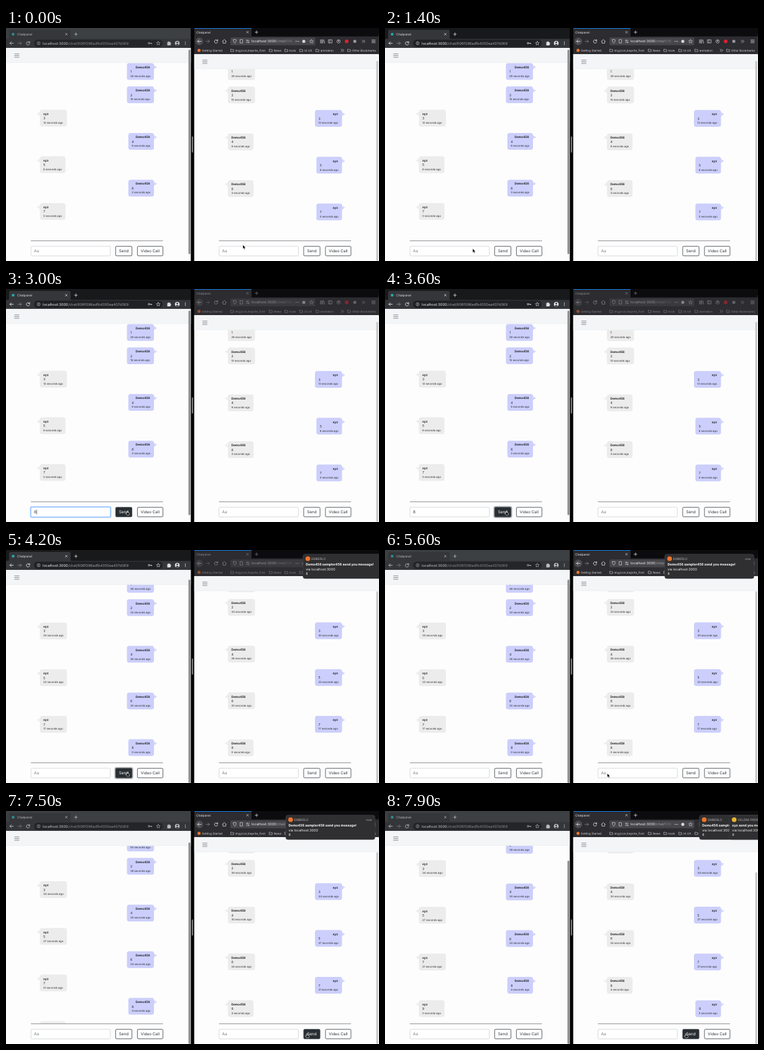
Recreate the animation shown at these times as an HTML page. Size 600 px wide and 375 px high, loop 8 s.

```html
<!DOCTYPE html>
<html lang="en">
<head>
<meta charset="utf-8">
<title>Chat</title>
<style>
  html, body { margin: 0; width: 100%; height: 100%; overflow: hidden; background: #000; }
  svg { display: block; width: 600px; height: 375px; }
  text { font-family: Inter, "Liberation Sans", sans-serif; text-rendering: geometricPrecision; white-space: pre; }
  .line { fill: none; stroke-linecap: round; stroke-linejoin: round; }
</style>
</head>
<body>
<svg id="stage" viewBox="0 0 600 375"></svg>
<script>
const LOOP = 8000;
const PAGE_X = 302.5;
const USERS = { a: 'Demo456', b: 'xyz' };
const SENDERS = 'aabababab';
const SENT = [3610, 7430];
const AGES = [
  [29, 15, 12, 9, 6, 3, 0],
  [46, 32, 30, 26, 23, 20, 17, 0],
  [50, 36, 34, 30, 27, 24, 21, 4, 0]
];

// Cursor stops: time, x, y
const PATH = [
  [0, 381, 349], [400, 381, 349], [1200, 141, 355], [2450, 141, 355],
  [2900, 195, 357.5], [4800, 195, 357.5], [5500, 357.5, 359.5],
  [6850, 357.5, 359.5], [7250, 484, 358.5], [LOOP, 484, 358.5]
];

const CHATS = [
  { x: 0, me: 'a', head: 32, first: 56.4, pitch: 37.55, scroll: [14.7, 37.6], lag: 0,
    focus: 1500, typed: 2000, blur: 3400, clear: SENT[0], digit: '8', bar: [293.6, 35, '#858585'] },
  { x: PAGE_X, me: 'b', head: 42, first: 56.7, pitch: 37.65, scroll: [15.6, 37.6], lag: 60,
    focus: 6050, typed: 6500, blur: 7300, clear: SENT[1], digit: '9', bar: [293.2, 53, '#c4c4c4'] }
];

const stage = document.getElementById('stage');
const get = id => document.getElementById(id);
const show = (el, on) => el.setAttribute('visibility', on ? 'visible' : 'hidden');
const move = (el, x, y) => el.setAttribute('transform', `translate(${x} ${y})`);
const ease = (t, start, span) => {
  const p = Math.min(1, Math.max(0, (t - start) / span));
  return (1 - Math.cos(Math.PI * p)) / 2;
};

const text = (x, y, s, size, fill, more = '') =>
  `<text x="${x}" y="${y}" font-size="${size}" fill="${fill}" ${more}>${s}</text>`;
const rect = (x, y, w, h, fill, more = '') =>
  `<rect x="${x}" y="${y}" width="${w}" height="${h}" fill="${fill}" ${more}/>`;
const dot = (x, y, r, fill, more = '') =>
  `<circle cx="${x}" cy="${y}" r="${r}" fill="${fill}" ${more}/>`;
const line = (d, color, w = 0.8, more = '') =>
  `<path class="line" d="${d}" stroke="${color}" stroke-width="${w}" ${more}/>`;

const arrow = (x, y, dir, c) =>
  line(`M${x - 2.8} ${y}h5.6M${x + dir * 2.8} ${y}l${-dir * 2.5} -2.5m${dir * 2.5} 2.5l${-dir * 2.5} 2.5`, c, 0.9);
const reload = (x, y, c) =>
  line(`M${x + 2.3} ${y - 1.2}a2.7 2.7 0 1 0 .3 2M${x + 2.6} ${y - 2.8}v1.9h-1.9`, c, 0.9);
const cross = (x, y, c) => line(`M${x - 1.5} ${y - 1.5}l3 3m0 -3l-3 3`, c, 0.7);
const plus = (x, y, c) => line(`M${x - 2.3} ${y}h4.6m-2.3 -2.3v4.6`, c, 0.8);
const bars = (x, y, w, gap, c) => line(`M${x} ${y}h${w}m${-w} ${gap}h${w}m${-w} ${gap}h${w}`, c, 0.8);
const star = (x, y, c) =>
  line(`M${x} ${y - 3}l.9 2 2.2 .2-1.7 1.4 .5 2.2-1.9-1.2-1.9 1.2 .5-2.2-1.7-1.4 2.2-.2z`, c, 0.6);
const more = (x, y, dx, dy, c) =>
  [-1, 0, 1].map(k => dot(x + k * dx, y + k * dy, 0.65, c)).join('');
const chevrons = (x, y, c) => line(`M${x - 2} ${y - 2}l2 2-2 2m2.6 -4l2 2-2 2`, c, 0.7);
const folder = (x, y, c) => line(`M${x - 2.2} ${y - 1.9}h1.6l.7 .8h2.2v3h-4.5z`, c, 0.6);

function chrome() {
  const c = '#dfe1e4', dim = '#85888c', y = 24.5;
  return rect(0, 0, 297.5, 18, '#202124', 'id="strip"') +
    '<path d="M3 18q2 0 2-2v-10.5q0-2.5 2.5-2.5h94q2.5 0 2.5 2.5v10.5q0 2 2 2z" fill="#35363a"/>' +
    rect(0, 17.5, 297.5, 14.5, '#35363a') + '<g id="leftUi">' +
    dot(11.5, 10, 2.3, '#2aa5a8') + text(18, 11.8, 'Chatpanel', 5, c) +
    cross(97, 10, c) + plus(112.5, 10, c) +
    arrow(9, y, -1, c) + arrow(22, y, 1, dim) + reload(35.5, y, c) +
    rect(45, 18.8, 207, 11.6, '#202124', 'rx="5.8"') +
    dot(52.5, y, 2.4, 'none', `stroke="${c}" stroke-width=".6"`) + line('M52.5 24.3v1.3m0-2.5v.1', c, 0.6) +
    text(59, 26.5, 'localhost:3000<tspan fill="#a0a3a8">/chat/606f096adfb4350ea407d369</tspan>', 5.75, '#f1f3f4') +
    dot(230, y, 1.3, 'none', `stroke="${c}" stroke-width=".8"`) + line('M231.4 24.5h3v1.2', c, 0.9) +
    star(245, y, c) +
    `<path d="M259.5 22.5h1.6a1 1 0 0 1 2 0h1.6v1.8a1 1 0 0 1 0 2v1.7h-5.2z" fill="${c}"/>` +
    dot(275.5, y, 3.8, c) + dot(275.5, 23.2, 1.3, '#35363a') +
    '<path d="M273 27q2.5-3 5 0q-2.500 1.800-5 0z" fill="#35363a"/>' +
    more(288.5, y, 0, 2, c) + '</g>';
}

function browser() {
  const c = '#d7d7db', dim = '#77777c', y = 21.5;
  const marks = [[364, 'img,Icon,Insprite_Font'], [426, 'News'], [451, 'tools'],
    [475, 'UI UX'], [501, 'animation'], [552, 'Other Bookmarks']];
  return rect(302.5, 0, 297.5, 14, '#0c0c0e') + rect(303, 0, 92, 14, '#2c2c31') +
    rect(303, 0, 92, 0.9, '#0a84ff') + rect(302.5, 13.5, 297.5, 28.500, '#2c2c31') +
    '<g id="rightUi">' + text(306, 8.8, 'Chatpanel', 4.8, '#f0f0f2') +
    cross(388.5, 6.8, c) + plus(403, 6.8, c) +
    dot(311, y, 5.8, '#4a4a50', 'stroke="#6a6a70" stroke-width=".4"') + arrow(311, y, -1, c) +
    arrow(324.500, y, 1, dim) + reload(338, y, c) +
    line('M348 21.500l3.200-3 3.200 3m-5.400-.6v3.500h4.400v-3.500', c, 0.8) +
    rect(361, 15.3, 136.500, 12.400, '#46464b', 'rx="1.500"') +
    line('M365.700 19l2.300-.8 2.300 .8q0 4.200-2.300 5.600q-2.300-1.400-2.300-5.600z', c, 0.7) +
    rect(376.700, 18.700, 3.800, 5.400, 'none', `stroke="${c}" stroke-width=".7"`) +
    line('M386.500 20h5m-5 3h5m-3.500-4v2m2 1v2', c, 0.7) +
    text(395, 23.4, 'localhost:3000<tspan fill="#a5a5aa">/chat/</tspan><tspan fill="#77777c">606</tspan>', 5.6, '#f6f6f8') +
    more(468.500, y, 2.200, 0, c) + dot(479, y, 2.500, c) + star(491.500, y, c) +
    line('M506 18.800v5.600m1.800-5.600v5.600m1.800-5.600v5.600m1.500-5.400l1.500 5.400', c, 0.8) +
    rect(518.800, 19, 5.600, 5, 'none', `stroke="${c}" stroke-width=".7"`) + line('M521 19v5', c, 0.7) +
    dot(535, y, 2.700, 'none', `stroke="${c}" stroke-width=".7"`) + dot(535, 21, 1, c) +
    dot(548, y, 3, '#d8232f') +
    rect(558.800, 19.200, 4.600, 4.600, '#9a9aa0', 'rx=".8"') + chevrons(575, y, c) +
    bars(588.500, 19.300, 5.400, 2.200, c) +
    dot(310.500, 36, 2.500, '#f0742c') + text(315, 37.700, 'Getting Started', 4.65, c) +
    marks.map(([x, s]) => folder(x, 36, c) + text(x + 4.7, 37.700, s, 4.65, c)).join('') +
    chevrons(541, 36, c) + '</g>';
}

function bubble(chat, i, n) {
  const who = SENDERS[n], mine = who === chat.me;
  const fill = mine ? '#cccffb' : '#ececec';
  const tail = mine ? 'M237.500 3.200l5.500 3.400-5.500 3.600z' : 'M55 3.200l-5.800 3.400 5.800 3.600z';
  const name = mine
    ? text(231.500, 8.300, USERS[who], 4.8, '#1d1f23', 'font-weight="700" text-anchor="end"')
    : text(60, 8.300, USERS[who], 4.8, '#1d1f23', 'font-weight="700"');
  return `<g id="b${i}${n}"><path d="${tail}" fill="${fill}" opacity=".8"/>` +
    rect(54.500, 0, 43, 27, fill, 'rx="3.500"') + name +
    text(60, 15.700, n + 1, 5.3, '#24262a') + text(60, 22.300, '', 4.3, '#24262a') + '</g>';
}

function page(chat, i) {
  const top = chat.head, edge = 'stroke="#343a40" stroke-width=".8"';
  const [barX, , barColor] = chat.bar;
  return `<g transform="translate(${chat.x} 0)">` +
    rect(0, top, 297.500, 375 - top, '#fdfdfd') +
    `<clipPath id="clip${i}"><rect x="0" y="${top + 24}" width="297.500" height="${318 - top}"/></clipPath>` +
    `<g clip-path="url(#clip${i})">` + [...SENDERS].map((_, n) => bubble(chat, i, n)).join('') + '</g>' +
    rect(0, top, 297.500, 24, '#f3f5f7') + rect(0, top + 23.700, 297.500, 0.4, '#e2e5e8') +
    bars(13.800, top + 9.700, 7.200, 2.700, '#6f7276') +
    rect(40, 342, 212.500, 0.8, '#77797c') +
    rect(39.500, 350.500, 129, 17, 'none', `id="ring${i}" rx="2.200" stroke="#9cc6fe" stroke-width="1.700"`) +
    rect(40.200, 351.200, 127.600, 15.600, '#fff', `id="box${i}" rx="1.600" stroke="#c6cacf" stroke-width=".7"`) +
    text(45, 361.300, 'Aa', 6.5, '#7b8086', `id="value${i}"`) +
    rect(49.200, 355.300, 0.5, 7.400, '#111', `id="caret${i}"`) +
    rect(175.300, 350.300, 28.500, 17.400, 'none', `id="halo${i}" rx="2.300" stroke="#a9acb0" stroke-width="1.500"`) +
    rect(176.400, 351.300, 26.200, 15.400, '#fff', `id="send${i}" rx="1.700" ${edge}`) +
    text(189.500, 361.300, 'Send', 6.4, '#2b3035', `id="label${i}" text-anchor="middle"`) +
    rect(211.400, 351.300, 41, 15.400, '#fff', `rx="1.700" ${edge}`) +
    text(231.900, 361.300, 'Video Call', 6.3, '#2b3035', 'text-anchor="middle"') +
    rect(barX, 0, 2.900, 329, barColor, `id="bar${i}" rx="1.400"`) + '</g>';
}

function notice(id, app, color, title, body) {
  return `<g id="${id}">` +
    rect(0, 6.700, 143.500, 39.300, '#2f2f31', 'rx="3.500" stroke="#4b4b4d" stroke-width=".5"') +
    dot(7.800, 14, 3.800, color) + text(13.500, 15.900, app, 4.9, '#b4b4b6') +
    text(138.500, 15.900, 'now', 4.6, '#b4b4b6', 'text-anchor="end"') +
    text(4.500, 24.900, title, 5.3, '#fff', 'font-weight="700"') +
    text(4.500, 32.500, 'via localhost:3000', 5.45, '#f2f2f2') +
    text(4.500, 40.300, body, 5.45, '#f2f2f2') + '</g>';
}

stage.innerHTML = rect(0, 0, 600, 375, '#000') +
  CHATS.map(page).join('') + chrome() + browser() +
  rect(297.500, 0, 5, 375, '#050505') + rect(299, 174.500, 1.800, 26, '#8a8a8a', 'rx=".9"') +
  notice('note0', 'EMBERLO', '#f0742c', `${USERS.a} sampler456 send you message!`, '8') +
  notice('note1', 'VELDRA PRISMO', '#eab42e', `${USERS.b} send you message!`, '9') +
  '<path id="arrow" d="M0 0v6.400l1.500-1.300 1 2.300 1.200-.5-1-2.200h2z" fill="#000" stroke="#fff" stroke-width=".5"/>' +
  '<path id="hand" d="M-.7 0q.7-.8 1.300 0v2.300l2.400 .5q.8 .3 .6 1.200l-.5 2.400h-3.500l-2.200-2.700q.3-1 1.900 0z" fill="#111" stroke="#fff" stroke-width=".6"/>';

function cursorAt(t) {
  const k = Math.max(1, PATH.findIndex(p => p[0] > t));
  const [t0, x0, y0] = PATH[k - 1], [t1, x1, y1] = PATH[k];
  const p = ease(t, t0, t1 - t0);
  return [x0 + (x1 - x0) * p, y0 + (y1 - y0) * p];
}

function drawChat(chat, i, t, cursorX) {
  const ages = AGES[SENT.filter(s => t >= s).length];
  const scroll = SENT.reduce((sum, s, k) => sum + chat.scroll[k] * ease(t, s + chat.lag, 350), 0);
  for (let n = 0; n < SENDERS.length; n++) {
    const el = get(`b${i}${n}`), on = n < ages.length;
    show(el, on);
    if (!on) continue;
    move(el, 0, chat.first + n * chat.pitch - scroll);
    const [box, name, num, age] = [...el.children].slice(1);
    const width = ages[n] > 9 ? 43.5 : 41.2;
    const x = SENDERS[n] === chat.me ? 238 - width : 54.5;
    box.setAttribute('x', x);
    box.setAttribute('width', width);
    num.setAttribute('x', x + 5.5);
    age.setAttribute('x', x + 5.5);
    age.textContent = `${ages[n]} seconds ago`;
  }
  const barY = chat.bar[1] + scroll * 0.86;
  const bar = get('bar' + i);
  bar.setAttribute('y', barY);
  bar.setAttribute('height', Math.min(329, 375 - barY));

  const focused = t >= chat.focus && t < chat.blur;
  const filled = t >= chat.typed && t < chat.clear;
  const since = t - (filled ? chat.typed : chat.focus);
  show(get('ring' + i), focused);
  get('box' + i).setAttribute('stroke', focused ? '#80b4fb' : '#c6cacf');
  const value = get('value' + i);
  value.textContent = filled ? chat.digit : 'Aa';
  value.setAttribute('fill', filled ? '#33383d' : '#7b8086');
  const caret = get('caret' + i);
  caret.setAttribute('x', filled ? 49.2 : 45);
  show(caret, focused && Math.floor(since / 500) % 2 === 0);

  const local = cursorX - chat.x;
  const hover = local > 176 && local < 203;
  get('send' + i).setAttribute('fill', hover ? '#292e33' : '#fff');
  get('label' + i).setAttribute('fill', hover ? '#fff' : '#2b3035');
  show(get('halo' + i), i === 0 && hover && t >= chat.blur);
  return hover;
}

function draw(t) {
  const [x, y] = cursorAt(t);
  const hover = CHATS.map((chat, i) => drawChat(chat, i, t, x)).some(Boolean);
  show(get('hand'), hover);
  show(get('arrow'), !hover);
  move(get('hand'), x, y);
  move(get('arrow'), x, y);

  const leftOn = t >= 1300 && t < 5550, rightOn = t < 1500 || t >= 5550;
  get('strip').setAttribute('fill', leftOn ? '#18191b' : '#3c4043');
  get('leftUi').setAttribute('opacity', leftOn ? 1 : 0.78);
  get('rightUi').setAttribute('opacity', rightOn ? 1 : 0.5);

  move(get('note0'), 600 - 150 * ease(t, 3950, 350) + 150 * ease(t, 7755, 350), 0);
  move(get('note1'), 600 - 150 * ease(t, 7770, 350), 0);
}

const start = performance.now();
function tick() {
  draw((performance.now() - start) % LOOP);
  requestAnimationFrame(tick);
}
tick();
</script>
</body>
</html>
```
